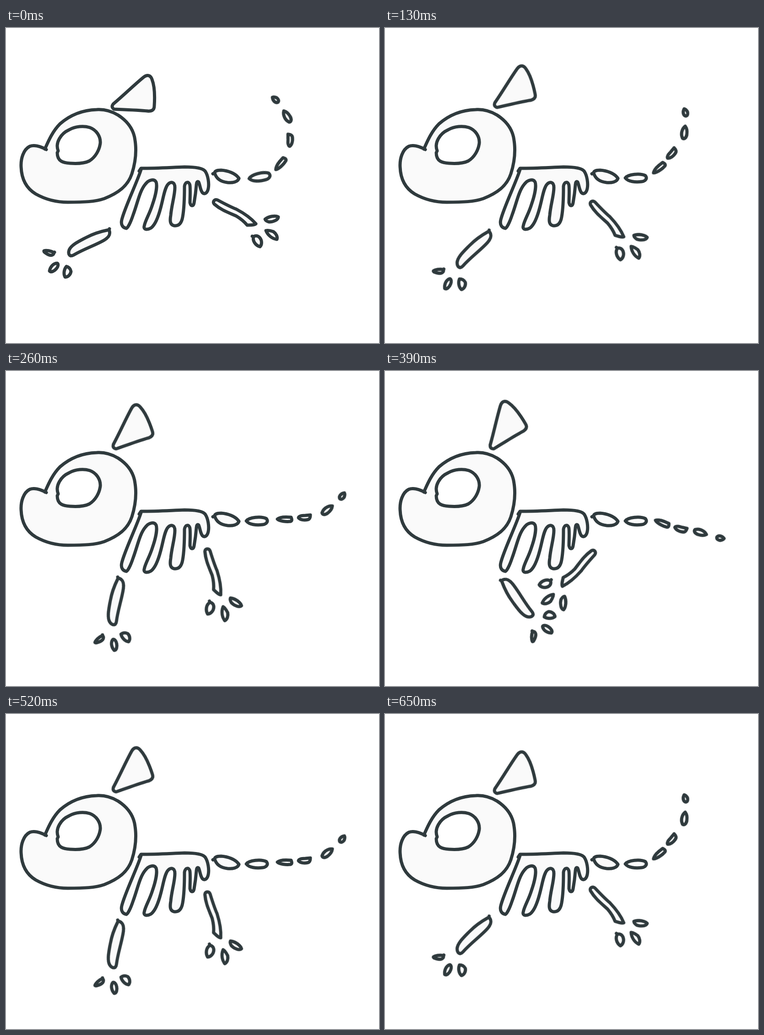
These frames come from a looping animation (815 px wide and 687 px high, 0.78 s). An HTML page:

```html
<!DOCTYPE html>
<html lang="en">
<head>
<meta charset="utf-8">
<title>Running skeleton</title>
<style>
  html, body { margin: 0; width: 100%; height: 100%; overflow: hidden; background: #fff; }
  svg { display: block; width: 100%; height: 100%; }
  path { fill: #fafafa; stroke: #2f3a3d; stroke-width: 7; stroke-linejoin: round; stroke-linecap: round; }
  .eye { fill: #fff; }
</style>
</head>
<body>
<svg viewBox="0 0 815 687">
  <!-- head -->
  <path d="M88 265C75 258 62 254 52 258C38 265 32 285 33 303C34 330 45 350 65 362C90 376 115 380 135 380C170 380 195 379 215 372C245 360 266 345 275 318C284 290 285 265 282 245C279 220 265 203 245 190C230 181 215 177 198 178C165 179 140 190 118 209C103 224 94 243 85 264"/>
  <path class="eye" d="M114 268C107 250 120 230 138 222C152 214 170 213 183 217C197 222 207 236 206 251C204 267 195 282 182 290C170 296 155 296 140 295C125 294 112 291 112 272Z"/>
  <!-- ribs -->
  <path d="M291 312L295 306C330 306 360 304 390 303C415 303 430 306 435 312C442 322 444 340 442 350C440 360 434 364 429 359C424 352 424 342 421 336C418 333 416 337 416 342C415 355 413 370 411 381C410 389 404 390 402 381C402 368 403 355 402 344C401 334 392 334 390 345C390 370 389 395 386 412C383 430 374 432 367 431C358 429 358 420 360 408C362 385 369 365 369 348C369 335 360 334 353 342C346 352 344 370 338 392C332 415 325 430 317 436C308 441 300 440 302 432C304 420 314 405 320 385C327 365 331 345 328 336C324 328 312 331 305 340C292 355 288 380 278 407C272 425 266 436 263 437C256 436 250 430 253 418C260 390 285 340 295 309"/>
  <!-- tail root -->
  <path d="M452 318L456 316C456 312 462 310 470 310C485 311 502 317 509 328C506 336 495 338 484 337C468 335 459 328 456 316"/>

  <g id="ear">
    <path d="M236 177C231 174 231 170 234 166C258 146 280 124 301 107C309 101 316 103 319 112C326 130 325 155 324 170C324 180 317 182 309 181C290 179 260 178 236 177Z"/>
  </g>
  <g id="front">
    <path d="M226 438L225 440C229 449 226 456 214 463C195 474 170 482 148 495C139 500 135 493 138 484C143 473 158 466 175 457C190 449 210 443 225 440"/>
    <path d="M106 489L105 490C104 496 98 497 92 494C86 491 82 488 83 486C88 484 98 486 105 490"/>
    <path d="M112 513C104 513 97 520 95 530C98 534 106 530 110 525C114 521 115 515 112 513Z"/>
    <path d="M132 520C127 526 125 536 129 543C135 544 141 538 142 531C141 525 137 521 132 520Z"/>
  </g>
  <g id="rear">
    <path d="M455 384C451 379 455 373 462 375C475 382 490 390 503 395C520 404 535 414 546 427C543 430 535 430 527 430C522 424 513 416 503 410C485 402 470 397 455 384Z"/>
    <path d="M566 417C574 411 588 408 595 412C595 418 585 423 575 423C570 422 567 420 566 417Z"/>
    <path d="M568 442C572 452 582 460 592 461C594 455 590 448 584 444C578 442 572 441 568 442Z"/>
    <path d="M538 454L541 455C538 464 545 474 555 477C560 472 559 463 555 458C551 453 546 452 541 455"/>
  </g>
  <g id="tail2"><path d="M-22 0C-16 -8 10 -11 22 -5C27 1 22 7 14 8C0 10 -16 8 -22 0Z"/></g>
  <g id="tail3"><path d="M-15 0C-10 -5 5 -5 15 -4C17 1 17 4 14 5C5 6 -10 5 -15 0Z"/></g>
  <g id="tail4"><path d="M13 -5C13 0 12 4 8 5C0 7 -9 6 -13 1C-12 -3 -5 -4 2 -4Z"/></g>
  <g id="tail5"><path d="M14 0C8 -6 -4 -8 -13 -2C-15 3 -10 6 -3 6C4 6 10 4 14 0Z"/></g>
  <g id="tail6"><path d="M9 0C4 -5 -4 -6 -7 -1C-8 4 -2 6 2 5C6 4 8 2 9 0Z"/></g>
</svg>
<script>
const STEP = 130;
const CYCLE = [0, 1, 2, 3, 2, 1];

// Each part: pivot, then [x, y, degrees] for the four poses.
const parts = {
  ear:   { pivot: [234, 170], poses: [[234, 170, 0], [241, 167, -15.3], [236, 164, -21.8], [232, 165, -34]] },
  front: { pivot: [181, 469], poses: [[181, 469, 0], [194, 484, -17.6], [241, 504, -52.2], [290, 496, -99]] },
  rear:  { pivot: [500, 402], poses: [[500, 402, 0], [486, 417, 18.5], [454, 438, 44.6], [423, 431, 104]] },
  tail2: { pivot: [0, 0], poses: [[553, 325, -9], [547, 327, 0], [547, 327, 0], [547, 327, 0]] },
  tail3: { pivot: [0, 0], poses: [[599, 297, -51], [598, 306, -41], [608, 323, 0], [605, 331, 21]] },
  tail4: { pivot: [0, 0], poses: [[620, 245, -85], [626, 274, -45], [652, 319, 0], [646, 344, 18]] },
  tail5: { pivot: [0, 0], poses: [[614, 193, -120], [654, 228, -82], [702, 303, -38], [689, 352, 19]] },
  tail6: { pivot: [0, 0], poses: [[589, 157, -140], [656, 185, -105], [734, 273, -53], [732, 364, 8]] }
};

function place([px, py], [x, y, deg]) {
  return `translate(${x}px, ${y}px) rotate(${deg}deg) translate(${-px}px, ${-py}px)`;
}

for (const [id, { pivot, poses }] of Object.entries(parts)) {
  const frames = [...CYCLE, CYCLE[0]].map((pose, i) => ({
    offset: i / CYCLE.length,
    transform: place(pivot, poses[pose]),
    easing: "step-end"
  }));
  const run = document.getElementById(id).animate(frames, {
    duration: STEP * CYCLE.length,
    iterations: Infinity
  });
  run.startTime = 0;
}
</script>
</body>
</html>
```
